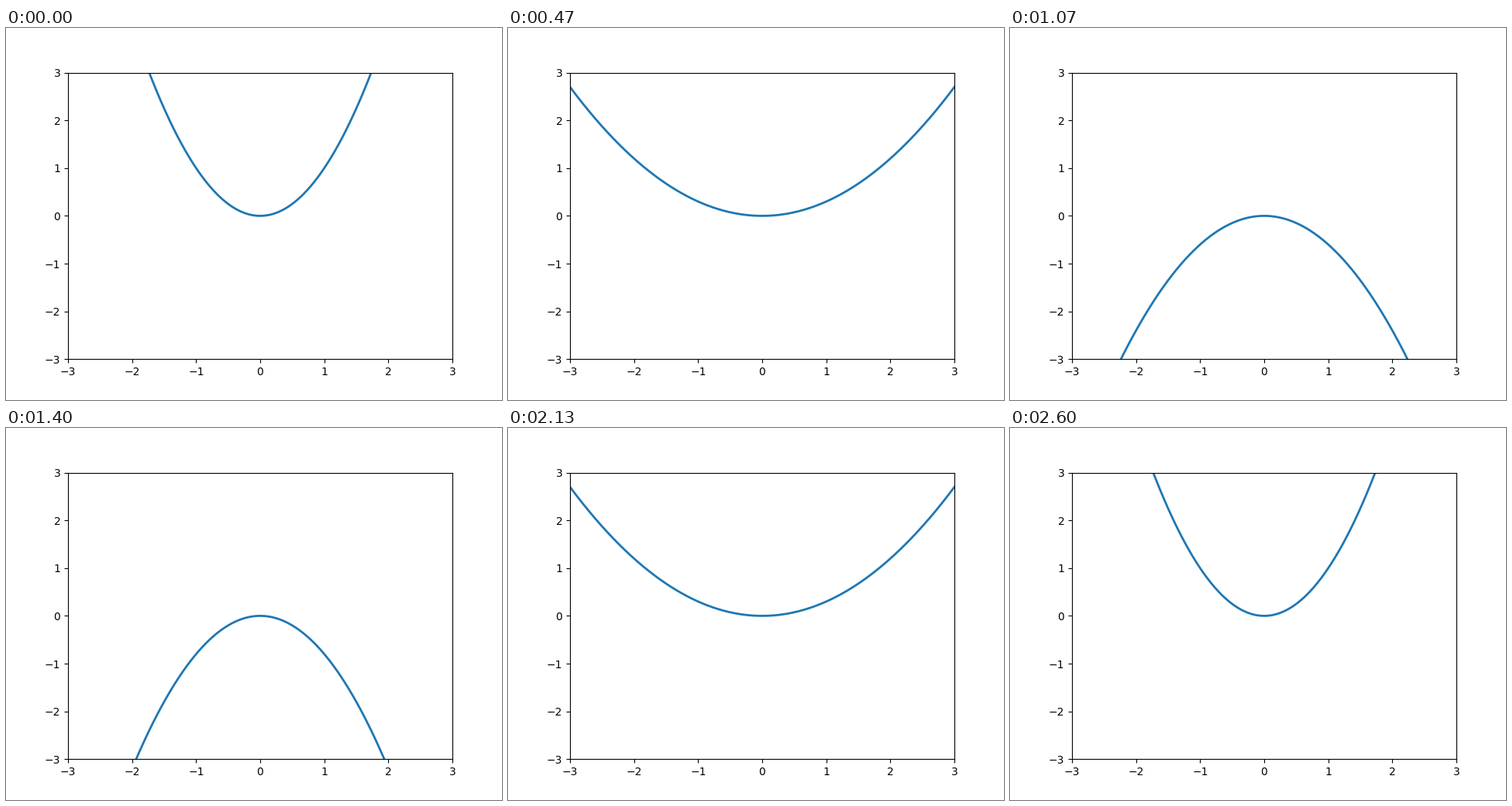
Write a matplotlib script that moves like this. It is 640 px wide and 480 px high and loops after 2.67 s.

```python
import numpy as np
import matplotlib.pyplot as plt
from matplotlib.animation import FuncAnimation

LOOP_MS = 2670
TICK_MS = 10
FPS = 15
STEPS = 40

fig, ax = plt.subplots(figsize=(6.4, 4.8), dpi=100)
ax.set(xlim=(-3, 3), ylim=(-3, 3))

x = np.linspace(-3, 3, 1000)
line, = ax.plot([], [], lw=2)


def coefficient(step):
    """Fall from 1 to -0.9 in tenths, hold one step, then climb back."""
    return 1 - 0.1 * min(step, STEPS - 1 - step)


def update(tick):
    # Steps run at 15 per second, snapped to the nearest 10 ms.
    step = int((tick + 0.5) * TICK_MS * FPS / 1000)
    line.set_data(x, coefficient(step) * x**2)
    return line,


anim = FuncAnimation(fig, update, frames=LOOP_MS // TICK_MS,
                     interval=TICK_MS, repeat=True, repeat_delay=0)
plt.show()
```
